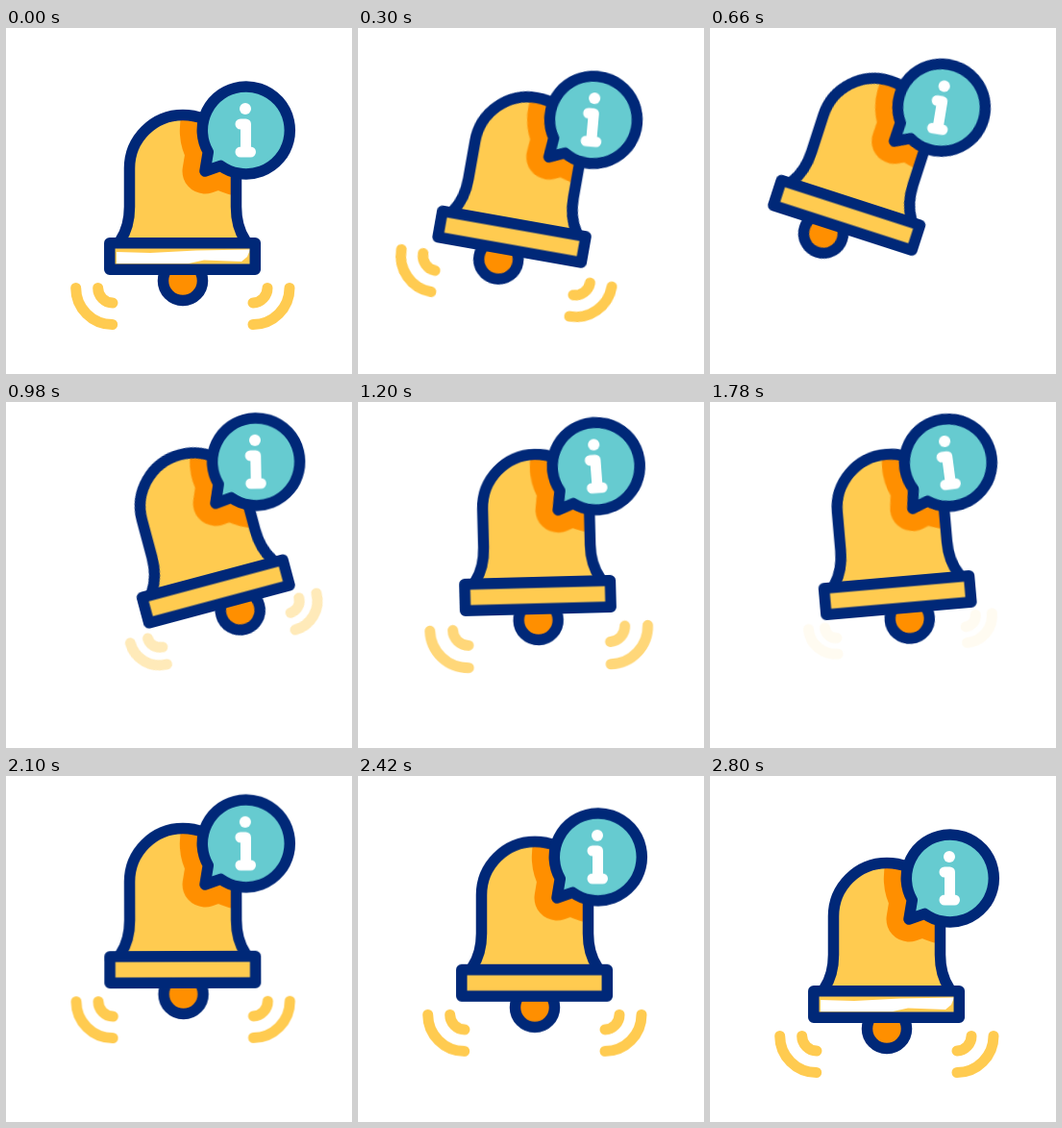
Animation of 360 by 360 pixels, one loop 2.82 s. Source, as an HTML page:

```html
<!DOCTYPE html>
<html lang="en">
<head>
<meta charset="utf-8">
<title>Notification bell</title>
<style>
  html, body { margin: 0; width: 100%; height: 100%; overflow: hidden; background: #fff; }
  svg { display: block; width: 100vw; height: 100vh; }

  .line { fill: none; stroke: #002878; stroke-width: 11.5; stroke-linejoin: round; stroke-linecap: round; }
  .yellow { fill: #ffcb50; }
  .orange { fill: #ff8f00; }
  .teal { fill: #66cbd0; }
  .shade { fill: #ff8f00; stroke: #ff8f00; stroke-width: 47; stroke-linejoin: round; }
  .info { fill: none; stroke: #fff; stroke-width: 11; stroke-linecap: round; stroke-linejoin: round; }
  .wave { fill: none; stroke: #ffcb50; stroke-width: 11; stroke-linecap: round; vector-effect: non-scaling-stroke; }

  .hop, .swing, .nod, .clapper, .wave, .glint {
    animation: 2820ms cubic-bezier(.37, 0, .63, 1) infinite;
  }
  .hop { animation-name: hop; }
  .swing { animation-name: swing; transform-origin: 184px 103px; }
  .nod { animation-name: nod; transform-origin: 207px 149px; }
  .clapper { animation-name: clap; }
  .wave { animation-name: spread, fade; animation-timing-function: cubic-bezier(.37, 0, .63, 1), linear; }
  .left { transform-origin: 133px 248px; }
  .right { transform-origin: 235px 248px; }
  .glint { animation-name: glint; animation-timing-function: step-end; }

  @keyframes hop {
    0%, 99.29%, 100% { transform: translateY(0); }
    21.28%, 75.89% { transform: translateY(-36px); }
  }
  @keyframes swing {
    0%, 75.89%, 100% { transform: rotate(0deg); }
    21.28% { transform: rotate(20deg); }
    34.93% { transform: rotate(-15deg); }
    49.5% { transform: rotate(10deg); }
    62.6% { transform: rotate(-5deg); }
  }
  @keyframes nod {
    0%, 75.89%, 100% { transform: rotate(0deg); }
    21.28% { transform: rotate(-10deg); }
    34.93% { transform: rotate(14deg); }
    49.5% { transform: rotate(-17deg); }
    62.6% { transform: rotate(-2.5deg); }
  }
  @keyframes clap {
    0%, 75.89%, 100% { transform: translateX(0); }
    21.28% { transform: translateX(-20px); }
    34.93% { transform: translateX(19px); }
    49.5% { transform: translateX(-17px); }
    62.6% { transform: translateX(10px); }
  }
  /* Each ripple grows in, spreads and vanishes. */
  @keyframes spread {
    0%, 10.64% { transform: scale(1); }
    19.86%, 50.35% { transform: scale(1.3); }
    19.87%, 31.06% { transform: scale(.72); }
    40.28% { transform: scale(1); }
    50.36%, 62.41% { transform: scale(.74); }
    71.28%, 100% { transform: scale(1); }
  }
  @keyframes fade {
    0%, 10.64%, 40.28%, 71.28%, 100% { opacity: 1; }
    19.86%, 31.06%, 50.35%, 62.41% { opacity: 0; }
  }
  @keyframes glint {
    0%, 99% { opacity: 1; }
    .7% { opacity: 0; }
  }
</style>
</head>
<body>
<svg viewBox="0 0 360 360">
  <defs>
    <path id="dome" d="M119 221C125 212 128.5 200 128.5 186V146A55.5 55.5 0 0 1 239.5 146V186C239.5 200 243 212 249 221"/>
    <path id="bubble" d="M210.3 129A45.5 45.5 0 1 1 223.3 143.4L207 149Z"/>
    <clipPath id="inside"><use href="#dome"/></clipPath>
  </defs>
  <g class="hop">
    <g class="swing">
      <path class="wave left" d="M72.7 270.5A38 38 0 0 0 110.7 308.5M95.7 270.5A15.5 15.5 0 0 0 111 286"/>
      <path class="wave right" d="M295 270.5A38 38 0 0 1 257 308.5M272 270.5A15.5 15.5 0 0 1 257 286"/>

      <g class="clapper">
        <circle class="orange" cx="184" cy="263" r="20.5"/>
        <circle class="line" cx="184" cy="263" r="20.5"/>
      </g>

      <use class="yellow" href="#dome"/>
      <g clip-path="url(#inside)">
        <g class="nod"><use class="shade" href="#bubble"/></g>
      </g>
      <use class="line" href="#dome"/>

      <rect class="yellow" x="107.8" y="223.8" width="151.5" height="27.5"/>
      <path class="glint" fill="#fff" d="M115 233L150 234L198 231.5L254 230.5L251 238L245 243L206 241.5L190 245H115Z"/>
      <rect class="line" x="107.8" y="223.8" width="151.5" height="27.5"/>

      <g class="nod">
        <use class="teal" href="#bubble"/>
        <use class="line" href="#bubble"/>
        <circle cx="249" cy="84" r="6" fill="#fff"/>
        <path class="info" d="M244 100H249.5V129M244 129H254.5"/>
      </g>
    </g>
  </g>
</svg>
</body>
</html>
```
